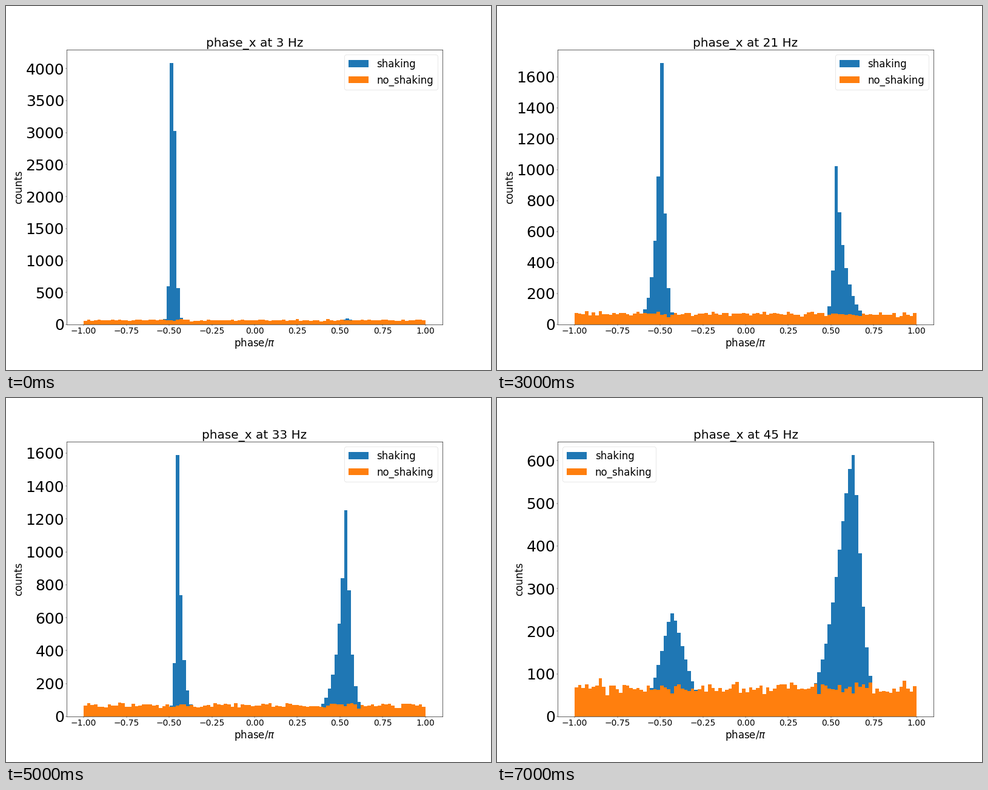
These frames come from a looping animation (800 px wide and 600 px high, 7500 ms). A matplotlib script:

```python
import matplotlib.pyplot as plt
import numpy as np
from matplotlib.animation import FuncAnimation

plt.rcParams.update({
    "font.family": "DejaVu Sans",
    "axes.titlesize": 36,
    "axes.labelsize": 30,
    "axes.linewidth": 1.1,
    "xtick.labelsize": 25,
    "ytick.labelsize": 45,
    "legend.fontsize": 30,
})

BINS = 100
FREQS = range(3, 46, 3)

# Peaks per frequency: (bin, height, left width, right width)
PEAKS = {
    3: [(26.38, 4092, 0.52, 0.6), (79, 95, 5, 5)],
    6: [(76.2, 4200, 0.8, 0.7)],
    9: [(27, 4532, 1.22, 0.75)],
    12: [(25.2, 3800, 1, 0.8)],
    15: [(25, 690, 1.3, 0.9), (76.2, 2880, 0.8, 1)],
    18: [(25, 980, 1.6, 0.9), (76.2, 2130, 0.9, 1.2)],
    21: [(25.15, 1690, 1.75, 0.9), (76, 1023, 0.93, 2.9)],
    24: [(25.15, 1650, 1.9, 0.9), (76.2, 985, 1, 2)],
    27: [(25.15, 1604, 2, 0.85), (76.35, 949, 1.1, 1.35)],
    30: [(26, 2100, 1.2, 1.1), (76, 1080, 1.8, 1.4)],
    33: [(28, 1590, 0.63, 1.3), (79.2, 1254, 2.5, 1.4)],
    36: [(27, 2050, 2.2, 1.8), (76, 470, 1.8, 1.6)],
    39: [(28, 1294, 4.8, 2.05), (75.9, 165, 1.3, 1.3)],
    42: [(27, 2050, 3, 2), (76, 120, 1.5, 1.5)],
    45: [(28, 242, 5.1, 5.7), (81, 614, 6.8, 3.3)],
}
SPAN_END = {3: 0.94, 9: 0.84, 33: 0.93}


def peak(center, height, left, right, power):
    d = np.arange(BINS) - center
    shape = np.exp(-np.abs(d / np.where(d < 0, left, right)) ** power)
    return height * shape / shape.max()


def shaking(hz):
    power = 1 if hz < 36 else 1.5   # sharp cusps turn into rounded humps
    return sum(peak(*p, power) for p in PEAKS[hz])


def no_shaking(hz):
    return np.random.default_rng(hz).poisson(67, BINS)


def draw_hist(counts, end, label):
    edges = np.linspace(-1, end, BINS + 1)
    centers = (edges[:-1] + edges[1:]) / 2
    ax.hist(centers, edges, weights=counts, label=label)


def update(i):
    hz = FREQS[i]
    ax.clear()
    draw_hist(shaking(hz), SPAN_END.get(hz, 1), "shaking")
    draw_hist(no_shaking(hz), 1, "no_shaking")
    ax.set_xlim(-1.1, 1.1)
    ax.set_title(f"phase_x at {hz} Hz")
    ax.set_xlabel(r"phase/$\pi$")
    ax.set_ylabel("counts")
    ax.legend(loc="best")


fig, ax = plt.subplots(figsize=(20, 15), dpi=40)
fig.subplots_adjust(left=0.125, right=0.9, bottom=0.125, top=0.88)
anim = FuncAnimation(fig, update, frames=len(FREQS), interval=500,
                     repeat=True, repeat_delay=0)
plt.show()
```
